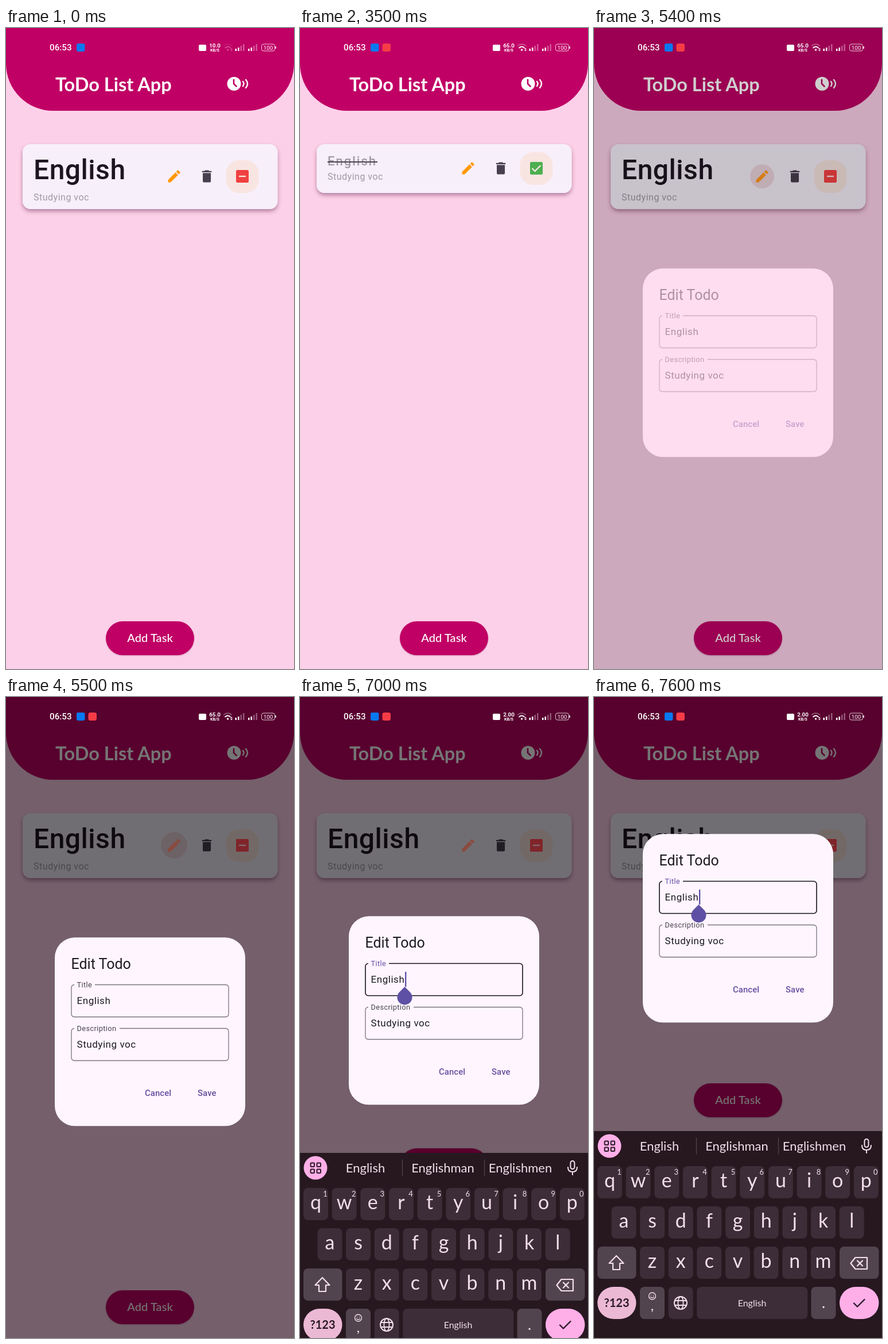
An HTML page for the animation above (8000 ms loop, 502 by 1115 pixels).

```html
<!DOCTYPE html>
<html lang="en">
<head>
<meta charset="utf-8">
<title>ToDo List App</title>
<style>
  html, body { margin: 0; width: 100%; height: 100%; overflow: hidden; background: #fdd0e9; }
  svg { display: block; width: 502px; height: 1115px; font-family: Roboto, sans-serif; }
  .lato { font-family: Lato, sans-serif; }
  .mid { text-anchor: middle; }
  .line { fill: none; stroke-linecap: round; stroke-linejoin: round; }

  /* 1.25% = 100 ms; poses are held, ten a second */
  .anim { animation: 8s step-end infinite; }
  .rate1 { animation-name: rate1; }
  .rate2 { animation-name: rate2; }
  .rate3 { animation-name: rate3; }
  .wifi { animation-name: wifi; }
  .rec { animation-name: rec; }
  .open { animation-name: open; }
  .done { animation-name: done; }
  .tap1 { animation-name: tap1; }
  .tap2 { animation-name: tap2; }
  .tap3 { animation-name: tap3; }
  .modal { animation-name: modal; }
  .dialog { animation-name: dialog; }
  .button { animation-name: button; }
  .keys { animation-name: keys; }
  .outline { animation-name: outline; }
  .label { animation-name: label; }
  .caret { animation-name: caret; }

  @keyframes rate1 { 0% { opacity: 1 } 5%, 100% { opacity: 0 } }
  @keyframes rate2 { 0% { opacity: 0 } 5% { opacity: 1 } 77.5%, 100% { opacity: 0 } }
  @keyframes rate3 { 0% { opacity: 0 } 77.5%, 100% { opacity: 1 } }
  @keyframes wifi { 0% { opacity: .3 } 5%, 100% { opacity: 1 } }
  @keyframes rec { 0% { opacity: 0 } 5% { opacity: .5 } 6.25%, 100% { opacity: 1 } }
  @keyframes open { 0% { opacity: 1 } 43.75% { opacity: 0 } 56.25%, 100% { opacity: 1 } }
  @keyframes done { 0% { opacity: 0 } 43.75% { opacity: 1 } 56.25%, 100% { opacity: 0 } }
  @keyframes tap1 {
    0% { opacity: 0; r: 10px }
    45% { opacity: .12; r: 20px }
    46.25% { opacity: .1; r: 25px }
    47.5% { opacity: .05; r: 28px }
    48.75%, 100% { opacity: 0; r: 28px }
  }
  @keyframes tap2 {
    0% { opacity: 0; r: 10px }
    57.5% { opacity: .12; r: 20px }
    58.75% { opacity: .1; r: 25px }
    60% { opacity: .05; r: 28px }
    61.25%, 100% { opacity: 0; r: 28px }
  }
  @keyframes tap3 {
    0% { opacity: 0; r: 8px }
    66.25% { opacity: .6; r: 16px }
    67.5% { opacity: .7; r: 21px }
    68.75% { opacity: .7; r: 23px }
    70% { opacity: .4; r: 23px }
    71.25%, 100% { opacity: 0; r: 23px }
  }
  @keyframes modal { 0% { opacity: 0 } 67.5% { opacity: .35 } 68.75%, 100% { opacity: 1 } }
  @keyframes dialog {
    0% { transform: none }
    87.5% { transform: translateY(-37px) }
    88.75% { transform: translateY(-150px) }
    90%, 100% { transform: translateY(-180px) }
  }
  @keyframes button {
    0% { transform: none }
    86.25% { transform: translateY(-60px) }
    87.5% { transform: translateY(-247px) }
    88.75%, 100% { transform: translateY(-360px) }
  }
  @keyframes keys {
    0% { transform: translateY(1115px) }
    86.25% { transform: translateY(960px) }
    87.5% { transform: translateY(793px) }
    88.75%, 100% { transform: translateY(755px) }
  }
  @keyframes outline {
    0% { stroke: #79747e; stroke-width: 1.3px }
    82.5%, 100% { stroke: #15101a; stroke-width: 1.6px }
  }
  @keyframes label { 0% { fill: #49454f } 82.5%, 100% { fill: #6550a4 } }
  @keyframes caret { 0% { opacity: 0 } 82.5%, 100% { opacity: 1 } }
</style>
</head>
<body>
<svg viewBox="0 0 502 1115">
  <defs>
    <filter id="shade" x="-10%" y="-20%" width="120%" height="150%">
      <feDropShadow dx="0" dy="4" stdDeviation="3.5" flood-color="#401030" flood-opacity=".38"/>
    </filter>
    <filter id="soft" x="-10%" y="-20%" width="120%" height="150%">
      <feDropShadow dx="0" dy="1" stdDeviation="1" flood-color="#401030" flood-opacity=".25"/>
    </filter>
    <path id="pencil" transform="translate(279 244) scale(1.17)" d="M3 17.25V21h3.75L17.81 9.94l-3.75-3.75zM20.71 7.04c.39-.39.39-1.02 0-1.41l-2.34-2.34c-.39-.39-1.02-.39-1.41 0l-1.83 1.83 3.75 3.75z"/>
    <path id="bin" transform="translate(336 244) scale(1.17)" d="M6 19c0 1.1.9 2 2 2h8c1.1 0 2-.9 2-2V7H6zM19 4h-3.5l-1-1h-5l-1 1H5v2h14z"/>
    <rect id="box" x="401" y="247" width="22" height="22" rx="2.5"/>
    <path id="minus" d="M406 258h12" stroke-width="2.4"/>
    <g id="tools">
      <rect x="383.500" y="230" width="57" height="57" rx="23" fill="#f8e5e1"/>
      <use href="#pencil" fill="#ff9800"/>
      <use href="#bin" fill="#49404f"/>
    </g>
    <g id="bars">
      <path d="M0 36h2.500v4H0zM4.500 34H7v6H4.500z"/>
      <path d="M9 31h2.500v9H9zM13.500 28H16v12h-2.500z" opacity=".35"/>
    </g>
  </defs>

  <rect width="502" height="1115" fill="#fdd0e9"/>
  <path d="M0 0H502V62A82 82 0 0 1 420 144H82A82 82 0 0 1 0 62z" fill="#c00065"/>
  <g fill="#fff">
    <text class="lato" x="86" y="110" font-size="32.500" font-weight="700">ToDo List App</text>
    <circle cx="397.500" cy="97" r="12"/>
    <path class="line" d="M397 90v7l4.500 4.500" stroke="#c00065" stroke-width="2.600"/>
    <path class="line" d="M413 93q3 4 0 8M418 90q6 7 0 14" stroke="#fff" stroke-width="2.400"/>
  </g>

  <g class="anim open">
    <rect x="29" y="202" width="444.500" height="113" rx="14" fill="#f7effa" filter="url(#shade)"/>
    <text x="48" y="263" font-size="48" font-weight="500" letter-spacing=".5" fill="#1d1520">English</text>
    <text x="48" y="300" font-size="16" letter-spacing=".5" fill="#a19ba3">Studying voc</text>
    <circle class="anim tap3" cx="293" cy="258" r="8" fill="#e9cbd2" opacity="0"/>
    <use href="#tools"/>
    <circle class="anim tap2" cx="412" cy="258" r="10" fill="#7d6d64" opacity="0"/>
    <use href="#box" fill="#f04040"/>
    <use href="#minus" stroke="#f8e5e1"/>
  </g>

  <g class="anim done" opacity="0">
    <rect x="29" y="202" width="444.500" height="85" rx="14" fill="#f7effa" filter="url(#shade)"/>
    <text x="48" y="239" font-size="22" font-weight="500" letter-spacing="2" fill="#a19ba3">English</text>
    <path d="M48 233h87" stroke="#4c4450" stroke-width="1.800"/>
    <text x="48" y="264" font-size="16" letter-spacing=".5" fill="#a19ba3">Studying voc</text>
    <g transform="translate(0 -14)">
      <use href="#tools"/>
      <circle class="anim tap1" cx="412" cy="258" r="10" fill="#7d6d64" opacity="0"/>
      <use href="#box" fill="#4caf50"/>
      <path d="M404.500 258l5 5 10-10" fill="none" stroke="#f8e5e1" stroke-width="2.300"/>
    </g>
  </g>

  <g class="anim button">
    <rect x="174" y="1032" width="154" height="59" rx="29.500" fill="#c00065" filter="url(#soft)"/>
    <text class="lato mid" x="251" y="1068" font-size="20" font-weight="500" letter-spacing=".1" fill="#fff">Add Task</text>
  </g>

  <g class="anim modal" opacity="0">
    <rect width="502" height="1115" opacity=".54"/>
    <use href="#pencil" fill="#8a4a40"/>
    <use href="#box" fill="#80252a"/>
    <use href="#minus" stroke="#7f696d"/>

    <g class="anim dialog">
      <rect x="85" y="418.300" width="332" height="328" rx="35" fill="#fef5ff"/>
      <text x="113.500" y="473" font-size="25" fill="#1d1b20">Edit Todo</text>
      <rect class="anim outline" x="114" y="500.500" width="274" height="56" rx="5" fill="none" stroke="#79747e"/>
      <rect x="114" y="576.500" width="274" height="56" rx="5" fill="none" stroke="#79747e" stroke-width="1.300"/>
      <path d="M119 500.500h36M119 576.500h79" stroke="#fef5ff" stroke-width="5"/>
      <g font-size="12.750" letter-spacing=".4" fill="#49454f">
        <text class="anim label" x="123.500" y="505">Title</text>
        <text x="123.500" y="581">Description</text>
      </g>
      <g font-size="17" letter-spacing=".55" fill="#1d1b20">
        <text x="123.500" y="534">English</text>
        <text x="123.500" y="610">Studying voc</text>
      </g>
      <g font-size="14.900" font-weight="500" letter-spacing=".1" fill="#65509f">
        <text x="242" y="694">Cancel</text>
        <text x="334" y="694">Save</text>
      </g>
      <g class="anim caret" opacity="0" fill="#5e50a4">
        <rect x="183" y="515" width="2.300" height="26"/>
        <path d="M182.500 541l9.200 9.200a13 13 0 1 1-18.400 0z"/>
      </g>
    </g>
  </g>

  <g class="anim keys" id="keys" transform="translate(0 1115)" fill="#f3dfea">
    <rect width="502" height="362" fill="#271820"/>
  </g>

  <g fill="#fff">
    <text x="76" y="39" font-size="15.200" font-weight="500">06:53</text>
    <rect x="123" y="27" width="14.500" height="14" rx="3" fill="#0878f0"/>
    <rect class="anim rec" x="143.500" y="27" width="14.500" height="14" rx="3.500" fill="#f53c46" opacity="0"/>
    <rect x="336" y="29" width="13" height="11" rx="2"/>
    <g class="mid" font-weight="700" font-size="9.800">
      <text class="anim rate1" x="364" y="34">10.0</text>
      <text class="anim rate2" x="364" y="34" opacity="0">65.0</text>
      <text class="anim rate3" x="364" y="34" opacity="0">2.00</text>
      <text x="364" y="41" font-size="7">KB/S</text>
    </g>
    <g class="anim wifi">
      <path class="line" d="M379.500 31q7-6 14 0" stroke="#fff" stroke-width="1.500" opacity=".4"/>
      <path class="line" d="M382 34.500q4.500-4 9 0" stroke="#fff" stroke-width="1.700"/>
      <circle cx="386.500" cy="38" r="1.700"/>
      <path d="M391 37l2-2.500 2 2.500zM391 38l2 2.500 2-2.500z"/>
    </g>
    <use href="#bars" x="399.500"/>
    <use href="#bars" x="422"/>
    <rect x="445.500" y="28" width="23" height="12" rx="3.500" fill="none" stroke="#fff" stroke-opacity=".8"/>
    <path d="M470 32v4" stroke="#fff" stroke-width="1.500"/>
    <text class="mid" x="457" y="37.600" font-size="9.800">100</text>
  </g>
</svg>

<script>
  const keys = document.getElementById('keys');
  const KEY = '#3c2d38', SIDE = '#52444f', INK = '#f3dfea', DARK = '#2b1a26';

  function add(tag, attrs, text) {
    const el = document.createElementNS('http://www.w3.org/2000/svg', tag);
    for (const name in attrs) el.setAttribute(name, attrs[name]);
    if (text) el.textContent = text;
    keys.append(el);
  }
  const key = (x, y, width, fill = KEY, rx = 8) => add('rect', { x, y, width, height: 56, rx, fill });
  const word = (x, y, size, text, extra) =>
    add('text', { class: 'lato mid', x, y, 'font-size': size, ...extra }, text);
  const line = (d, stroke = INK, width = 2.2) =>
    add('path', { class: 'line', d, stroke, 'stroke-width': width });

  function row(letters, x, y, digits = '') {
    [...letters].forEach((letter, i) => {
      const left = x + i * 49.65;
      key(left, y, 43);
      word(left + 21.5, y + 37, 34, letter);
      if (digits) word(left + 38, y + 14.5, 13, digits[i]);
    });
  }

  // suggestion bar
  add('circle', { cx: 27, cy: 26, r: 20.5, fill: '#ffafe8' });
  for (const x of [18.5, 29.5])
    for (const y of [17.5, 28.5])
      add('rect', { x, y, width: 6.5, height: 6.5, rx: 1.2, fill: 'none', stroke: DARK, 'stroke-width': 2 });
  word(114, 34, 22, 'English');
  word(249, 34, 22, 'Englishman');
  word(384, 34, 22, 'Englishmen');
  line('M178.500 12v28M321.500 12v28', '#55464f', 1.2);
  add('rect', { x: 471.5, y: 14, width: 7, height: 14, rx: 3.5, fill: 'none', stroke: INK, 'stroke-width': 2 });
  line('M467 25q0 8 8 8t8-8M475 33v5', INK, 2);

  // letters
  row('qwertyuiop', 6, 61, '1234567890');
  row('asdfghjkl', 30.5, 131);
  row('zxcvbnm', 80, 201);

  // shift and backspace
  key(6, 201, 67.5, SIDE);
  line('M39 217l12.500 13h-6.500v11h-12v-11h-6.500z');
  key(428, 201, 68.5, SIDE);
  line('M455.500 220h20.500v20h-20.500l-8-10zM459 225.500l9 9M468 225.500l-9 9');

  // bottom row
  key(6, 271, 67.5, '#ecb9d5', 28);
  word(39.5, 306, 20, '?123', { 'font-weight': 700, fill: DARK });
  key(80, 271, 43, SIDE);
  add('circle', { cx: 101.5, cy: 287, r: 6, fill: 'none', stroke: INK, 'stroke-width': 1.4 });
  line('M99.500 285.500v.1M103.500 285.500v.1M98.500 288.500q3 3 6 0', INK, 1.4);
  word(101.5, 312, 24, ',');
  key(129.7, 271, 43);
  add('circle', { cx: 151, cy: 299, r: 11, fill: 'none', stroke: INK, 'stroke-width': 2 });
  add('ellipse', { cx: 151, cy: 299, rx: 4.6, ry: 11, fill: 'none', stroke: INK, 'stroke-width': 1.8 });
  line('M141 295h20M141 303h20', INK, 1.8);
  key(179.3, 271, 193);
  word(275.5, 304.5, 16, 'English');
  key(378.5, 271, 43, SIDE);
  word(400, 308, 26, '.');
  key(428, 271, 68.5, '#ffafe8', 28);
  line('M453 299.500l6 6 12.500-12.500', DARK, 2.4);
</script>
</body>
</html>
```
